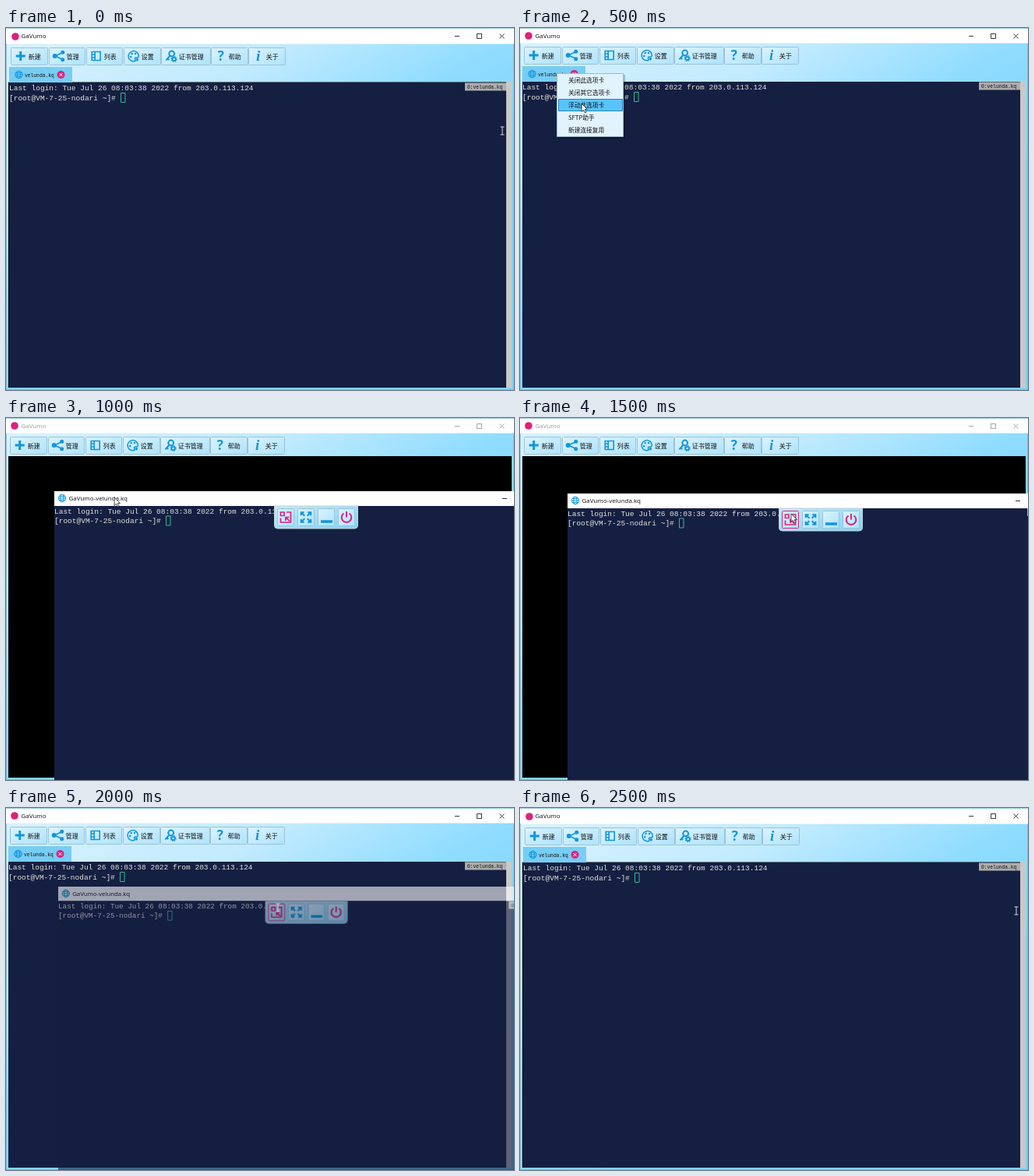
These frames come from a looping animation (652x465 px, 3 s). An HTML page:

```html
<!DOCTYPE html>
<html lang="zh-CN">
<head>
<meta charset="utf-8">
<title>Terminal tabs</title>
<style>
  html, body { margin: 0; width: 100%; height: 100%; overflow: hidden; background: #fff; }
  svg { display: block; width: 652px; height: 465px; }
  text { font: 8px "Noto Sans CJK SC", "Noto Sans CJK", sans-serif; fill: #111; white-space: pre; }
  .title { font: 8px "Open Sans", "Noto Sans", sans-serif; }
  .term { font: 9.5px "Liberation Mono", monospace; fill: #e2e2da; }
  .tiny { font: 6.3px "Liberation Mono", monospace; }
  .menu text { font-size: 7.7px; }
  .line { fill: none; stroke: #1296db; stroke-width: 2; }
  .solid { fill: #1296db; }
  .pink { stroke: #d9237d; }
  .btn { fill: url(#face); stroke: #9cc3d6; }

  /* every scene is a hard cut on a half-second grid */
  .anim { animation: 3s step-end infinite; }
  #title { animation-name: dim; }
  #controls { animation-name: dimLine; }
  .nudge { animation-name: nudge; }
  .drop { animation-name: drop; }
  .docked { animation-name: docked; }
  #menu { animation-name: menu; }
  #float { animation-name: float; }
  #tools { animation-name: tools; }
  #hover { animation-name: hover; }
  #floatMin { animation-name: floatMin; }
  #arrow { animation-name: arrow; }
  #beam { animation-name: beam; }

  @keyframes dim { 0%, 66.6667% { fill: #111; } 33.3333% { fill: #999; } }
  @keyframes dimLine { 0%, 66.6667% { stroke: #222; } 33.3333% { stroke: #999; } }
  @keyframes nudge { 0%, 83.3333% { transform: translate(1px, 1px); } 16.6667% { transform: none; } }
  @keyframes drop { 0%, 83.3333% { transform: translate(0, 1px); } 16.6667% { transform: none; } }
  @keyframes docked { 0%, 66.6667% { visibility: visible; } 33.3333% { visibility: hidden; } }
  @keyframes menu { 0%, 33.3333% { visibility: hidden; } 16.6667% { visibility: visible; } }
  @keyframes float {
    0%, 83.3333% { visibility: hidden; }
    33.3333% { visibility: visible; transform: translate(62px, 94px); opacity: 1; }
    50% { visibility: visible; transform: translate(61px, 97px); opacity: 1; }
    66.6667% { visibility: visible; transform: translate(67px, 101px) scale(.98); opacity: .6; }
  }
  @keyframes tools { 0% { transform: translate(282px, 18px); } 50% { transform: translate(271px, 18px); } }
  @keyframes hover { 0% { stroke: #9cc3d6; } 50% { stroke: #d9237d; } }
  @keyframes floatMin { 0% { opacity: 1; } 66.6667% { opacity: 0; } }
  @keyframes arrow {
    0%, 66.6667% { visibility: hidden; }
    16.6667% { visibility: visible; transform: translate(79px, 97px); }
    33.3333% { visibility: visible; transform: translate(139px, 102px); }
    50% { visibility: visible; transform: translate(348px, 123px); }
  }
  @keyframes beam {
    0%, 83.3333% { visibility: visible; transform: translate(637px, 132px); }
    16.6667% { visibility: hidden; }
    66.6667% { visibility: visible; transform: translate(349px, 128px); }
  }
</style>
</head>
<body>
<svg viewBox="0 0 652 465">
  <defs>
    <linearGradient id="sky" gradientUnits="userSpaceOnUse" x1="200" y1="-100" x2="420" y2="300">
      <stop offset="0" stop-color="#d9f2fe"/>
      <stop offset=".4" stop-color="#c2ebff"/>
      <stop offset=".7" stop-color="#8fdcff"/>
      <stop offset="1" stop-color="#7fd4fb"/>
    </linearGradient>
    <linearGradient id="face" x2="1" y2="1">
      <stop offset="0" stop-color="#dcf3ff"/>
      <stop offset="1" stop-color="#ade3fc"/>
    </linearGradient>
    <linearGradient id="panel" x2="1" y2="1">
      <stop offset="0" stop-color="#c4ebfd"/>
      <stop offset="1" stop-color="#80d2fa"/>
    </linearGradient>
    <clipPath id="pane"><path d="M0 0H649V462H0Z"/></clipPath>

    <g id="globe" class="line" style="stroke-width:1">
      <circle r="4.7"/><ellipse rx="2.1" ry="4.7"/>
      <path d="M-4.7 0H4.7M-4-2.5H4M-4 2.5H4"/>
    </g>
    <g id="session">
      <text class="term" y="10">Last login: Tue Jul 26 08:03:38 2022 from 203.0.113.124</text>
      <text class="term" y="22.7">[root@VM-7-25-nodari ~]# </text>
      <path d="M143.5 13.5h5.5v12h-5.5z" fill="none" stroke="#35b892"/>
    </g>
    <g id="badge">
      <path d="M0 0H53V10H0Z" fill="#adadad"/>
      <text class="tiny" x="3" y="7.2">0:velunda.kq</text>
    </g>

    <path id="new" class="line" d="M-6 0H6M0-6V6" style="stroke-width:3"/>
    <g id="manage">
      <path class="line" d="M5.5-4.5L-5 0L5.5 4.5" style="stroke-width:1.6"/>
      <g class="solid"><circle cx="-5" r="3"/><circle cx="5" cy="-4.7" r="2.5"/><circle cx="5" cy="4.7" r="2.5"/></g>
    </g>
    <path id="list" class="line" d="M-5.5-5.5H5.5V5.5H-5.5ZM-1.5-5.5V5.5M-5-2H-2M-5 2H-2" style="stroke-width:1.6"/>
    <g id="setup">
      <path class="line" d="M2 6.5A6.6 6.6 0 1 1 6.6 0Q6.5 2.5 3.5 2Q1 2 2 4.5Z" style="stroke-width:1.5"/>
      <g class="solid"><circle cx="-3.5" cy="1" r="1.3"/><circle cx="-2" cy="-3" r="1.3"/><circle cx="2.3" cy="-3" r="1.3"/><circle cx="4.6" cy="4.8" r="1.8"/></g>
    </g>
    <g id="cert">
      <circle class="line" cx="1" cy="-3" r="3.4"/>
      <path class="line" d="M-1.5 0L-6.3 5.3M-4.3 3.2L-2.5 5"/>
      <circle class="line" cx="4" cy="4" r="2.2" style="stroke-width:1.8"/>
      <circle class="line" cx="4" cy="4" r="3.4" style="stroke-width:1.2;stroke-dasharray:1.5 1.17"/>
    </g>
    <text id="help" y="6" text-anchor="middle" style="font:bold 17px 'Open Sans',sans-serif;fill:#1296db">?</text>
    <text id="about" y="6" text-anchor="middle" style="font:italic bold 19px 'Liberation Serif',serif;fill:#1296db">i</text>
  </defs>

  <!-- main window -->
  <rect width="652" height="465" fill="url(#sky)"/>
  <g class="anim nudge"><path d="M-2-2H654V19.5H-2Z" fill="#fff"/><circle cx="11" cy="10" r="4.8" fill="#d9237d"/></g>
  <text id="title" class="title anim" x="19.5" y="13">GaVumo</text>
  <path id="controls" class="anim" d="M576 10.5H582M604.5 7.5h6v6h-6zM633.5 7.5l6 6m0-6l-6 6" fill="none" stroke="#222" stroke-width=".9"/>

  <g clip-path="url(#pane)">
    <path d="M3 49H649V462H3Z" fill="#000"/>
    <g class="anim docked">
      <path d="M2 48H650V69.5H2Z" fill="url(#sky)"/>
      <path d="M642 69H649V462H642Z" fill="#c9c9c9"/>
      <g class="anim nudge">
        <path d="M3 69H641V463H3Z" fill="#141f42"/>
        <path d="M3 49H84V69H3Z" fill="#77cdf3"/>
        <use href="#globe" x="15.5" y="59"/>
        <text class="tiny" x="23" y="61.5">velunda.kq</text>
        <circle cx="69.5" cy="59" r="5" fill="#d9237d"/>
        <path d="M67.5 57l4 4m0-4l-4 4" stroke="#fff"/>
        <use href="#session" x="3" y="69"/>
      </g>
      <path d="M641 70H642V462H641Z" fill="#141f42"/>
      <g class="anim drop"><use href="#badge" x="589" y="69.5"/></g>
    </g>
  </g>
  <g id="toolbar" class="anim nudge"></g>
  <path d="M0 .5H652M651.5 20V465M.5 20V465M0 464.5H652" fill="none" stroke="#78b4ce" stroke-opacity=".7"/>

  <!-- tab menu -->
  <g id="menu" class="menu anim">
    <path d="M49 60H135V142H49Z" fill="#000" opacity=".2"/>
    <path d="M47.5 58.5h85v81h-85z" fill="#e2f3fe" stroke="#9fb9c8"/>
    <path d="M49.5 91.5h82v15h-82z" fill="#58c4fb" stroke="#2387bd"/>
  </g>

  <!-- detached window -->
  <g id="float" class="anim">
    <path d="M0 0H652V19H0Z" fill="#fff"/>
    <path d="M0 19H652V400H0Z" fill="#141f42"/>
    <use href="#globe" x="10" y="9"/>
    <text class="title" x="18.5" y="12">GaVumo-velunda.kq</text>
    <path id="floatMin" class="anim" d="M575 9.5H581" stroke="#333"/>
    <use href="#session" y="18.5"/>
    <use href="#badge" x="590" y="19"/>
    <g id="tools" class="anim">
      <path d="M.5 1H107.500V26Q107.500 30 103.500 30H4.500Q.5 30 .5 26Z" fill="url(#panel)" stroke="#c5d3cf"/>
      <g class="btn">
        <rect id="hover" class="anim" x="4.500" y="4.500" width="21" height="22" rx="1"/>
        <rect x="30.500" y="4.500" width="21" height="22" rx="1"/>
        <rect x="56.500" y="4.500" width="21" height="22" rx="1"/>
        <rect x="82.500" y="4.500" width="21" height="22" rx="1"/>
      </g>
      <path class="line pink" transform="translate(15 15.500)" d="M-6.500-6.500h4.500v4.500h-4.500zM1-6.500H6.500V6.500H-6.500V1M5 5L0 0M0 4.500V0H4.500" style="stroke-width:1.700"/>
      <g id="expand" class="line" transform="translate(41 15.500)"></g>
      <path class="line" d="M60 21H75" style="stroke-width:3.500"/>
      <path class="line pink" transform="translate(93 15.500)" d="M-3.500-5A6.300 6.300 0 1 0 3.500-5M0-7.500V0"/>
    </g>
  </g>

  <path id="arrow" class="anim" d="M0 0V10.500L2.500 8.200L4.300 12L6 11.200L4.300 7.600H7.500Z" fill="#fff" stroke="#222" stroke-width=".8"/>
  <path id="beam" class="anim" d="M-2.500-5H2.500M0-5V5M-2.500 5H2.500" fill="none" stroke="#d5d8df"/>
</svg>
<script>
  const el = id => document.getElementById(id);
  const add = (id, markup) => el(id).insertAdjacentHTML('beforeend', markup);

  const buttons = [
    [5, 47, 'new', '新建'], [54, 46, 'manage', '管理'], [102, 46, 'list', '列表'],
    [150, 47, 'setup', '设置'], [198, 63, 'cert', '证书管理'],
    [262, 47, 'help', '帮助'], [310, 47, 'about', '关于']
  ];
  for (const [x, w, icon, label] of buttons) {
    add('toolbar', `<rect class="btn" x="${x + .5}" y="24.5" width="${w}" height="22" rx="1"/>
      <use href="#${icon}" x="${x + 12.7}" y="35"/><text x="${x + 22.7}" y="38.7">${label}</text>`);
  }

  ['关闭此选项卡', '关闭其它选项卡', '浮动此选项卡', 'SFTP助手', '新建连接复用'].forEach((label, i) =>
    add('menu', `<text x="62" y="${70 + i * 16}">${label}</text>`));

  for (let a = 0; a < 360; a += 90)
    add('expand', `<path transform="rotate(${a})" d="M1.700 1.700L6 6M6.300 2.300V6.300H2.300"/>`);
</script>
</body>
</html>
```
